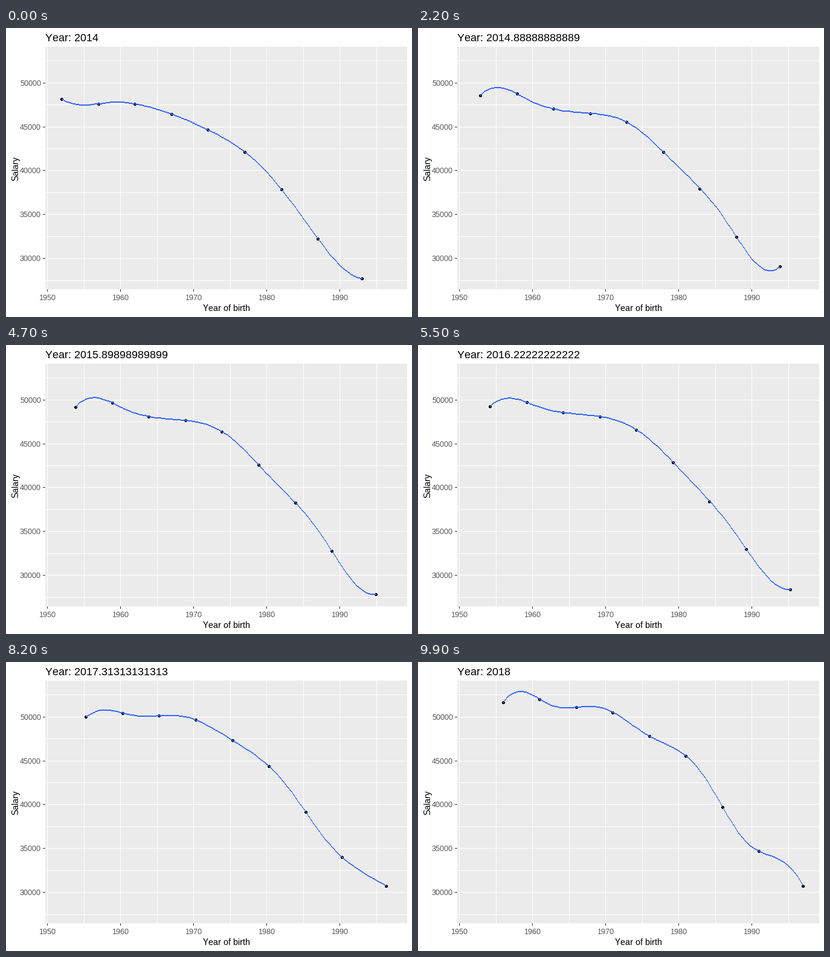
These frames come from a looping animation (672x480 px, 10000 ms). A matplotlib script:

```python
import numpy as np
import matplotlib.pyplot as plt
from matplotlib.animation import FuncAnimation
from matplotlib.patches import Circle, Polygon, Rectangle

W, H, DPI = 672, 480, 96
FRAMES, INTERVAL = 100, 100
LEFT, RIGHT, TOP, BOTTOM = 65, 664, 31, 434
FIRST, LAST = 2014, 2018

plt.rcParams.update({
    "font.family": "Liberation Sans",
    "text.hinting": "default",
    "text.hinting_factor": 1,
    "text.kerning_factor": 6,
})

# Birth cohorts: starting salary, total rise and lag behind a steady rise
BIRTH = np.append(np.arange(1952, 1988, 5), 1993)
START = np.array([48140, 47590, 47590, 46400, 44610, 42090, 37830, 32190, 27680])
RISE = np.array([3480, 4410, 3480, 4100, 3150, 3420, 1840, 2460, 3000])
LAG = np.array([1000, 400, 1290, 760, -240, 1210, 480, 600, 180])

# Faster waves: an early swing among the oldest, a zigzag for the youngest
J = np.arange(len(BIRTH))
SWING = 900 * np.sin(J * np.pi / 2 + 0.7) * np.exp(-(J / 3.2) ** 4)
ZIGZAG = 1320 * (J / J[-1]) ** 24 - 380 * np.exp(-(J / 2.2) ** 2)


def yearly(n):
    """Salaries n whole years after the first."""
    t = n / (LAST - FIRST)
    wave = np.sin(np.pi * t * np.arange(1, 4))
    return START + RISE * t - LAG * wave[0] + SWING * wave[1] + ZIGZAG * wave[2]


def salaries(shift):
    n = min(int(shift), LAST - FIRST - 1)
    f = shift - n
    return (1 - f) * yearly(n) + f * yearly(n + 1)


def px(year):
    return np.rint(67.99 + (np.asarray(year) - 1950) * 12.11)


def py(salary):
    return np.rint(90.8 + (50000 - np.asarray(salary)) * 72.84 / 5000)


def basis(x):
    """Cubic regression spline with five quantile knots."""
    span = BIRTH[-1] - BIRTH[0]
    t = (x - BIRTH[0]) / span
    knots = (np.quantile(BIRTH, np.arange(1, 6) / 6) - BIRTH[0]) / span
    powers = [t ** k for k in range(4)]
    return np.stack(powers + [np.clip(t - k, 0, None) ** 3 for k in knots], axis=1)


GRID = np.linspace(BIRTH[0], BIRTH[-1], 80)
SMOOTH = basis(GRID) @ np.linalg.inv(basis(BIRTH))

fig = plt.figure(figsize=(W / DPI, H / DPI), dpi=DPI, facecolor="white")
ax = fig.add_axes([0, 0, 1, 1])
ax.set_xlim(0, W)
ax.set_ylim(H, 0)
ax.axis("off")


def box(x, y, w, h, color):
    ax.add_patch(Rectangle((x, y), w, h, fc=color, lw=0, antialiased=False, zorder=1))


def label(x, y, s, size, color="black", **kw):
    return ax.text(x, y, s, fontsize=size * 72 / DPI, color=color,
                   va="baseline", zorder=5, **kw)


box(LEFT, TOP, RIGHT - LEFT, BOTTOM - TOP, "#EBEBEB")
for year in range(1950, 2000, 5):
    x = px(year)
    box(x, TOP, 1, BOTTOM - TOP, "white")
    if year % 10 == 0:
        box(x, BOTTOM, 1, 4, "#333333")
        label(x + 0.5, 452, str(year), 12, "#4D4D4D", ha="center")
for salary in range(27500, 55000, 2500):
    y = py(salary)
    box(LEFT, y, RIGHT - LEFT, 1, "white")
    if salary % 5000 == 0:
        box(LEFT - 4, y, 4, 1, "#333333")
        label(58, y + 5, str(salary), 12, "#4D4D4D", ha="right")

label(364.5, 470, "Year of birth", 15, ha="center")
label(20, 233, "Salary", 15, ha="center", rotation=90, rotation_mode="anchor")
title = label(LEFT, 22, "", 18, ha="left")

# Without antialiasing every touched pixel is filled: radius 2 covers 5 pixels
dots = [ax.add_patch(Circle((0, 0), 2, fc="black", lw=0, antialiased=False, zorder=2))
        for _ in BIRTH]
curve = ax.add_patch(Polygon([(0, 0), (1, 0), (1, 1)], closed=True, fc="#3366FF",
                             lw=0, antialiased=False, zorder=3))


def ribbon(x, y):
    """Pixel staircase along a path, two pixels high in each column."""
    cols = np.arange(x[0], x[-1] + 1)
    top = np.repeat(np.rint(np.interp(cols, x, y)) - 1, 2)
    edge = np.column_stack([cols, cols + 1]).ravel()
    return np.vstack([np.column_stack([edge, top]),
                      np.column_stack([edge, top + 2])[::-1]])


def update(i):
    shift = (LAST - FIRST) * i / (FRAMES - 1)
    pay = salaries(shift)
    title.set_text(f"Year: {FIRST + shift:.15g}")
    for dot, x, y in zip(dots, px(BIRTH + shift), py(pay)):
        dot.center = (x + 0.5, y + 0.5)
    curve.set_xy(ribbon(px(GRID + shift), py(SMOOTH @ pay)))
    return [title, curve, *dots]


anim = FuncAnimation(fig, update, frames=FRAMES, interval=INTERVAL,
                     repeat=True, repeat_delay=0, blit=False)
plt.show()
```
